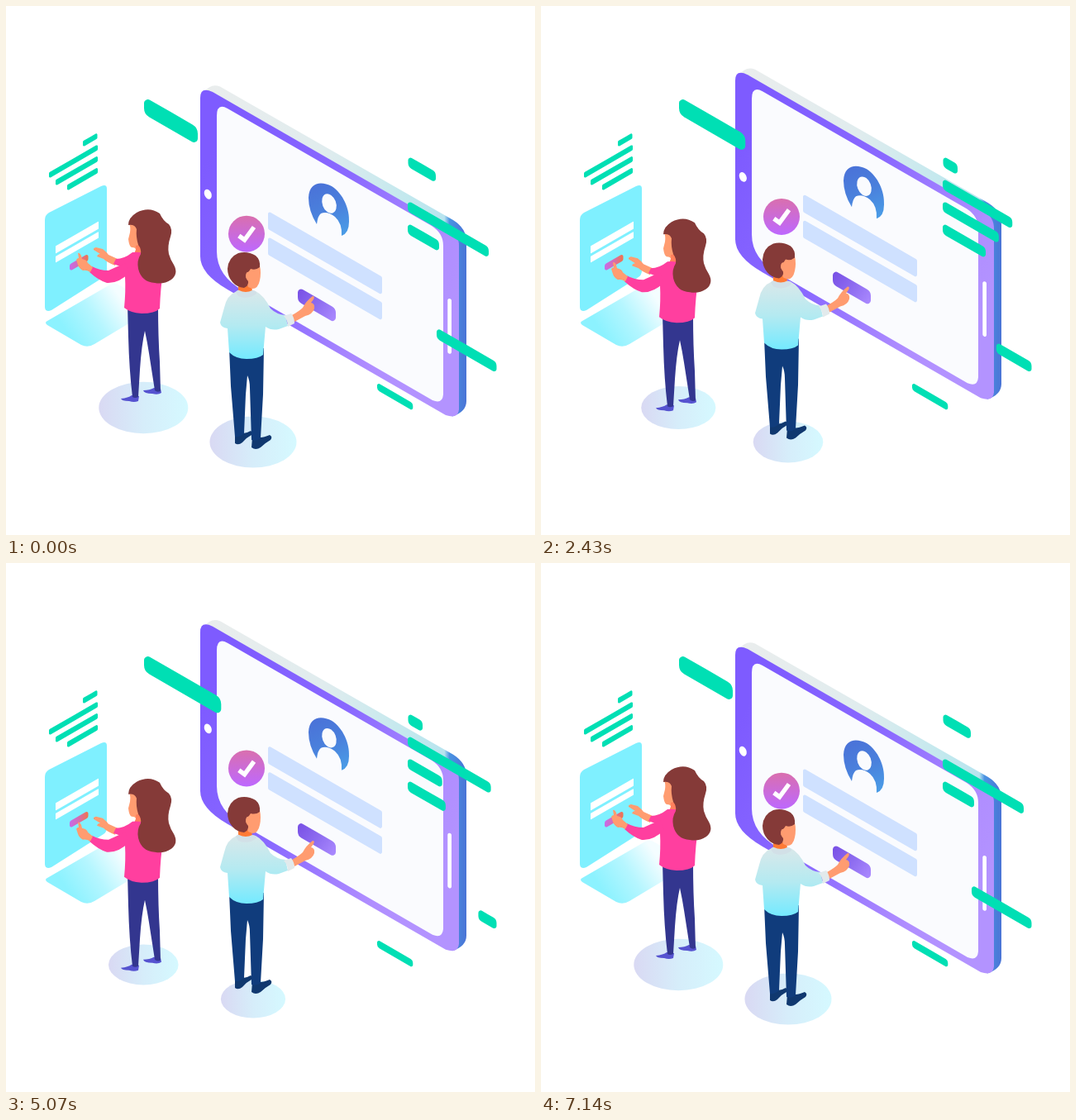
Write an HTML page with a canvas that moves like this. It is 640 by 640 pixels and loops after 7.21 s.

```html
<!DOCTYPE html>
<html lang="en">
<head>
<meta charset="utf-8">
<title>Sign-up scene</title>
<style>
  html, body { margin: 0; width: 100%; height: 100%; overflow: hidden; background: #fff; }
  canvas { display: block; width: 640px; height: 640px; }
</style>
</head>
<body>
<canvas id="stage"></canvas>
<script>
const canvas = document.getElementById('stage');
const dpr = Math.max(1, window.devicePixelRatio || 1);
canvas.width = canvas.height = 640 * dpr;
const ctx = canvas.getContext('2d');

const LOOP = 7210, FPS = 14, SLOPE = 0.577;
const TEAL = '#00dfb4', SKIN = '#ff9c70', HAIR = '#853a38';

function grad(x0, y0, x1, y1, ...stops) {
  const g = ctx.createLinearGradient(x0, y0, x1, y1);
  stops.forEach((s, i) => Array.isArray(s)
    ? g.addColorStop(s[0], s[1])
    : g.addColorStop(i / (stops.length - 1), s));
  return g;
}

const paths = {};
function shape(d, paint) {
  ctx.fillStyle = paint;
  ctx.fill(paths[d] || (paths[d] = new Path2D(d)));
}

function oval(x, y, rx, ry, paint, turn = 0) {
  ctx.fillStyle = paint;
  ctx.beginPath();
  ctx.ellipse(x, y, rx, ry, turn, 0, Math.PI * 2);
  ctx.fill();
}

// Slanted bar with vertical ends; y is the top-left corner, a and b the acute and obtuse radii.
function slant(x0, x1, y, h, paint, a, b, slope = SLOPE) {
  const len = x1 - x0;
  if (len < 1) return;
  const k = Math.min(1, len / (a * 1.5 + b * 0.5 + 0.1));
  const yr = y + len * slope, mx = (x0 + x1) / 2, my = (y + yr) / 2;
  const [tl, tr] = slope > 0 ? [a * k, b * k] : [b * k, a * k];
  ctx.fillStyle = paint;
  ctx.beginPath();
  ctx.moveTo(mx, my);
  ctx.arcTo(x1, yr, x1, yr + h / 2, tr);
  ctx.arcTo(x1, yr + h, mx, my + h, tl);
  ctx.arcTo(x0, y + h, x0, y + h / 2, tr);
  ctx.arcTo(x0, y, mx, my, tl);
  ctx.closePath();
  ctx.fill();
}

const leaf = (x0, x1, y, h) => slant(x0, x1, y, h, TEAL, h * 0.22, h * 0.6);

function shifted(dy, draw) {
  ctx.save();
  ctx.translate(0, dy);
  draw();
  ctx.restore();
}

// Linear keys, one every 25 steps
function key(n, ...v) {
  const i = Math.min(3, Math.floor(n / 25));
  return v[i] + (v[i + 1] - v[i]) * (n / 25 - i);
}

function shadow(x, y, rx, ry, s) {
  oval(x, y, rx * s, ry * s, grad(x - rx * s, 0, x + rx * s, 0, '#d9d9f3', '#d6edfa', '#d5f9ff'));
}

function laptop() {
  shape('M50 381L126 337Q131 334 136 337L182 364L107 409Q99 414 91 410L50 386Q46 383 50 381Z',
    grad(76, 398, 140, 355, '#8cf2ff', '#b5f6ff', '#f4fdff'));
  shape('M47 259Q47 253 52 250L115 218Q122 215 122 221L122 320Q122 325 118 328L55 368Q47 371 47 364Z', '#7ff0ff');
  slant(60, 112, 290.5, 9, '#fff', 0.6, 0.6, -SLOPE);
  slant(60, 112, 303, 7.5, '#fff', 0.6, 0.6, -SLOPE);
  slant(77, 99.5, 312.5, 8.5, grad(77, 0, 99, 0, '#c66bea', '#d56cb4', '#f0744e'), 2, 3.5, -SLOPE);
  for (const [x, x1, y] of [[93, 110.5, 163.5], [52, 111, 201.5], [60, 111, 210.5], [74, 111, 216.5]])
    slant(x, x1, y, 7, TEAL, 1.3, 2.2, -SLOPE);
}

function woman() {
  shape('M139 475Q148 474 152 471L161 472L160 478Q155 480 149 478Q140 478 139 475Z'
    + 'M166 465Q174 465 179 462L187 463L188 468Q184 471 177 469Q167 469 166 465Z', '#5653d0');
  shape('M147 362L148 400Q149 440 153 473Q156 475 160 473L162 440Q164 410 168 393Q171 407 173 420L180 465'
    + 'Q183 468 187 466L186 430Q184 400 184 362Z', '#33368f');
  shape('M106 295Q105 293 109 292L117 294Q122 298 124 301L135 306L132 314Q122 310 118 306L110 303Q111 300 114 300Z', SKIN);
  shape('M149 263Q151 267 150 274L148 282Q149 291 152 292Q157 292 157 295L155 300L164 301L166 280L162 262Z', SKIN);
  shape('M157 290L164 288L164 301L155 300Q158 295 157 290Z', '#ff7f5c');
  shape('M133 306Q143 306 153 298Q162 297 168 300L190 322Q187 340 186 366Q180 372 164 372Q150 371 143 365'
    + 'Q145 345 144 327L142 315Q136 315 130 312Z', '#ff3f9f');
  shape('M104 315Q113 320 124 320L144 311L149 323Q136 336 122 335Q112 332 101 322Z', '#ff3f9f');
  shape('M87 299Q89 298 91 302L92 306Q98 307 99 311L105 316L102 322Q97 319 93 320Q88 317 87 313L85 307'
    + 'Q86 305 88 305Z', SKIN);
  shape('M148 265Q148 256 158 250Q173 242 186 251Q190 260 197 264Q202 270 199 279Q195 291 197 300'
    + 'Q199 307 203 313Q209 324 200 331Q191 337 180 335Q164 334 160 318Q158 308 163 300Q164 294 160 289'
    + 'Q157 279 158 270Q156 264 148 265Z', HAIR);
}

function phone() {
  shape('M240 104Q248 93 259 97.5L541 259Q557 269 557 285L557 478Q557 491 540 496.5L520 470Z',
    grad(243, 0, 557, 0, '#eaeded', [0.45, '#e0ecee'], [0.8, '#c0e8ee'], [0.915, '#b8e4ef'], [0.935, '#4a93e2'], '#4a74d6'));
  shape('M235 111Q235 97 250 104L535 268Q548 276 548 290L548 488Q547 500 532 495L268 343Q235 324 235 303Z',
    grad(240, 190, 545, 370, '#7e5bff', [0.45, '#8a69ff'], [0.85, '#b08eff'], '#b393ff'));
  shape('M255 133Q255 117 268 124L515 266Q529 275 529 290L529 470Q528 482 516 477L288 345Q255 327 255 297Z', '#fafbfe');
  oval(244.3, 227.7, 4.2, 6.2, '#fff', -0.4);
  slant(534.3, 539, 352.5, 67, '#fff', 2, 2.3);

  shape('M376 264Q366 248 366 232C367 212 382 212 394 218C408 227 416 246 415 261Q415 275 406 278'
    + 'Q407 263 398 255Q389 248 381 251Q377 254 376 264Z', grad(375, 215, 400, 278, '#4a72d8', '#4a80dc', '#4a9be6'));
  oval(391, 239, 8.2, 12.2, '#fafbfe', -0.36);

  slant(317, 455, 248, 22, '#cfe1ff', 2, 3);
  slant(317, 455, 279, 22, '#cfe1ff', 2, 3);
  slant(353, 399, 339.5, 18, grad(353, 345, 399, 380, '#7951e6', '#8e6df0', '#ab8aff'), 4, 9);

  oval(291, 275.7, 22, 22, grad(0, 254, 0, 298, '#d96fae', '#cb6bd8', '#bd68ff'));
  ctx.strokeStyle = '#fff';
  ctx.lineWidth = 5.4;
  ctx.beginPath();
  ctx.moveTo(281.8, 278);
  ctx.lineTo(288.6, 283);
  ctx.lineTo(300, 267.5);
  ctx.stroke();
}

function man() {
  const navy = '#103c7c';
  shape('M277 518L277 529Q281 532 286 528Q291 522 297 519Q299 516 296 514Q291 517 287 517Z'
    + 'M298 522L297 534Q302 538 308 534Q313 529 320 525Q323 521 319 519Q312 522 308 522Z', '#10386f');
  shape('M270 414L272 460L277 521Q283 522 288 517L290 470L292 447Q295 453 295 462L297 525Q303 527 308 523L311 470L312 414Z', navy);
  shape('M346 374Q355 369 359 365Q363 357 371 351Q374 351 372 355L369 359Q374 360 373 366Q371 373 362 375L349 382Z', SKIN);
  shape('M279 345Q267 350 264 365L259 383Q260 389 268 390L270 419Q278 427 291 427Q305 427 311 422L314 388'
    + 'Q321 393 330 391L341 387L338 374Q327 373 320 366Q312 350 302 345Z',
    grad(0, 345, 0, 427, '#d9e8ea', '#b4eaf1', '#74eaff'));
  shape('M336 375L345 372Q349 377 349 384L341 388Q341 380 336 375Z', '#e2eaec');
  shape('M281 338L297 336L298 346Q290 350 281 345Z', '#ff7a34');
  shape('M278 346Q280 343 282 344Q290 348 298 344Q303 344 303 348Q293 356 281 351Z', '#d2e0e7');
  shape('M297 312L307 314Q309 323 307 332Q305 342 298 342L293 340L288 326Z', SKIN);
  shape('M268 318Q269 304 281 299Q292 296 302 302Q308 307 307 316Q302 320 296 318Q294 322 291 323Q289 329 293 333'
    + 'Q294 338 288 341Q279 340 274 334Q268 327 268 318Z', HAIR);
  oval(292.3, 326, 2.1, 4, SKIN, 0.1);
}

function bars(n) {
  leaf(167, key(n, 232, 273, 201.5, 271.5, 232), 109.6, 21.3);
  leaf(486.5, key(n, 520, 495, 520, 501, 520), 181.4, 13.2);
  leaf(486, key(n, 486, 600.5, 516.5, 600, 486), 208.4, 13.2);
  leaf(486, key(n, 584, 537, 584, 517, 584), 235.3, 13.2);
  leaf(486, key(n, 524, 558, 502.5, 537.5, 524), 262.4, 13.2);
  const left = key(n, 521, 556.5, 540.7, 577.3, 521);
  leaf(left, 593.5, 431 - (593.5 - left) * SLOPE, 13.2);
  leaf(449, 492.3, 455.5, 9.2);
}

function draw(time) {
  const n = Math.min(100, Math.floor((time % LOOP + 4.9) * FPS / 1000));
  const p = 1 - Math.abs(n % 50 - 25) / 25;
  ctx.setTransform(dpr, 0, 0, dpr, 0, 0);
  ctx.fillStyle = '#fff';
  ctx.fillRect(0, 0, 640, 640);
  laptop();
  shadow(166.3, 486, 54, 31.2, 1 - 0.258 * p);
  shifted(17.5 * p, woman);
  shifted(-32.5 * p, phone);
  shadow(299, 527.5, 52.5, 31, 1 - 0.304 * p);
  shifted(-18 * p, man);
  bars(n);
}

const start = performance.now();
function tick() {
  draw(performance.now() - start);
  requestAnimationFrame(tick);
}
tick();
</script>
</body>
</html>
```
